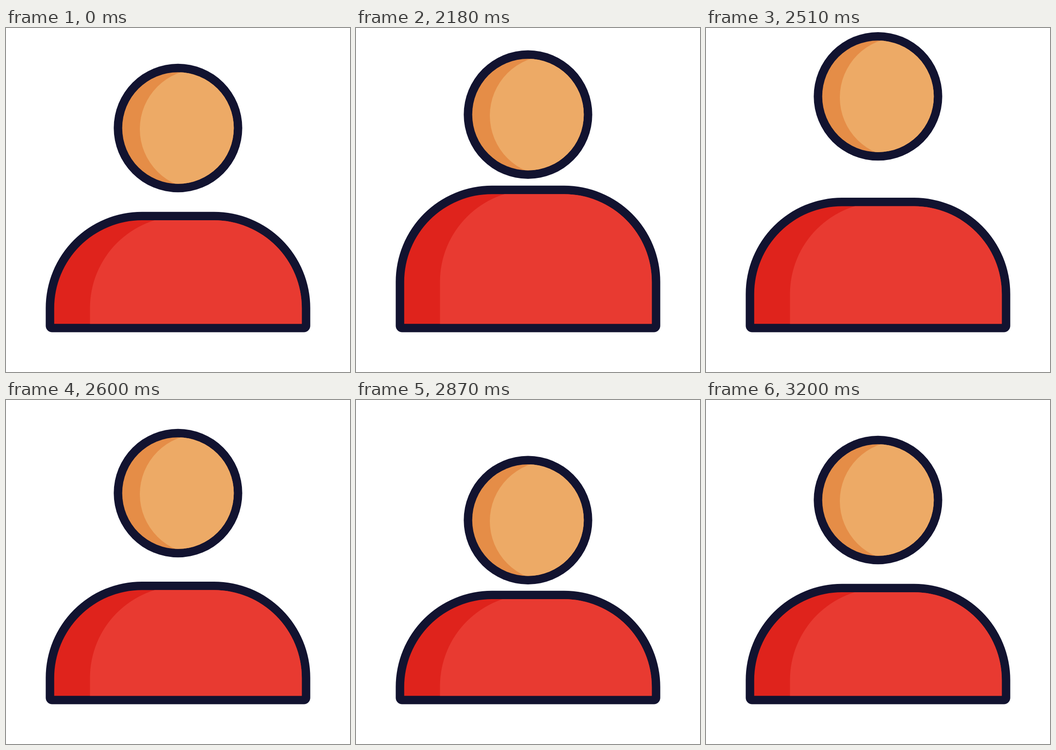
An HTML page with a canvas that plays this animation: 748x748 px, repeating every 3.23 s.

```html
<!DOCTYPE html>
<html lang="en">
<head>
<meta charset="utf-8">
<title>Avatar</title>
<style>
  html, body { margin: 0; height: 100%; overflow: hidden; background: #fff; }
  canvas { display: block; width: 748px; height: 748px; }
</style>
</head>
<body>
<canvas id="stage" width="748" height="748"></canvas>
<script>
const ctx = document.getElementById('stage').getContext('2d');
const LOOP = 3230, REST = 2000, STEP = 30;
const INK = '#121330', SKIN = '#edaa66', SKIN_SHADE = '#e58d47';
const SHIRT = '#e83a31', SHIRT_SHADE = '#df231c';

const smooth = u => u * u * (3 - 2 * u);
const easeOut = u => 1 - Math.pow(1 - u, 1.8);

// Each key is [step, vertical offset, easing used to arrive there].
const HEAD = [[0, 0], [15, -83, smooth], [25, 53, smooth], [40, 0, smooth]];
const TORSO = [[0, 0], [10, -70.5, easeOut], [25, 18.2, smooth], [40, 0, smooth]];
const TORSO_SHADE = [...TORSO.slice(0, 3), [37, 0, smooth]];

function valueAt(keys, step) {
  for (let i = 1; i < keys.length; i++) {
    const [start, from] = keys[i - 1];
    const [end, to, ease] = keys[i];
    if (step <= end) return from + (to - from) * ease((step - start) / (end - start));
  }
  return keys[keys.length - 1][1];
}

function circle(x, y, r) {
  const path = new Path2D();
  path.arc(x, y, r, 0, Math.PI * 2);
  return path;
}

// Half-dome: big round shoulders, straight sides, optional small bottom corners.
function dome(left, right, bottom, centerY, radius, corner) {
  const path = new Path2D();
  const l = left + radius, r = right - radius;
  path.moveTo(left, bottom - corner);
  path.arc(l, centerY, radius, Math.PI, Math.PI * 1.5);
  path.arc(r, centerY, radius, Math.PI * 1.5, Math.PI * 2);
  path.arcTo(right, bottom, right - corner, bottom, corner);
  path.arcTo(left, bottom, left, bottom - corner, corner);
  path.closePath();
  return path;
}

function paint(outer, inner, light, shadeColor, lightColor) {
  ctx.fillStyle = INK;
  ctx.fill(outer);
  ctx.fillStyle = shadeColor;
  ctx.fill(inner);
  ctx.save();
  ctx.clip(inner);
  ctx.fillStyle = lightColor;
  ctx.fill(light);
  ctx.restore();
}

function drawTorso(offset, shadeOffset) {
  const y = 609 + offset;
  paint(
    dome(86.4, 661.6, 661.6, y, 209.3, 14),
    dome(104.8, 643.2, 643.2, y, 190.9, 0),
    dome(182.6, 900, 660, 609 + shadeOffset, 200, 0),
    SHIRT_SHADE, SHIRT
  );
}

function drawHead(offset) {
  const y = 217.5 + offset;
  paint(
    circle(374, y, 139.7),
    circle(374, y, 121.3),
    circle(421.6, y + 2.3, 130.6),
    SKIN_SHADE, SKIN
  );
}

function render(now) {
  const time = now % LOOP;
  const step = Math.max(0, Math.floor((time - REST + 0.01) / STEP));
  ctx.fillStyle = '#fff';
  ctx.fillRect(0, 0, 748, 748);
  drawTorso(valueAt(TORSO, step), valueAt(TORSO_SHADE, step));
  drawHead(valueAt(HEAD, step));
}

const begin = performance.now();
function tick() {
  render(performance.now() - begin);
  requestAnimationFrame(tick);
}
tick();
</script>
</body>
</html>
```
